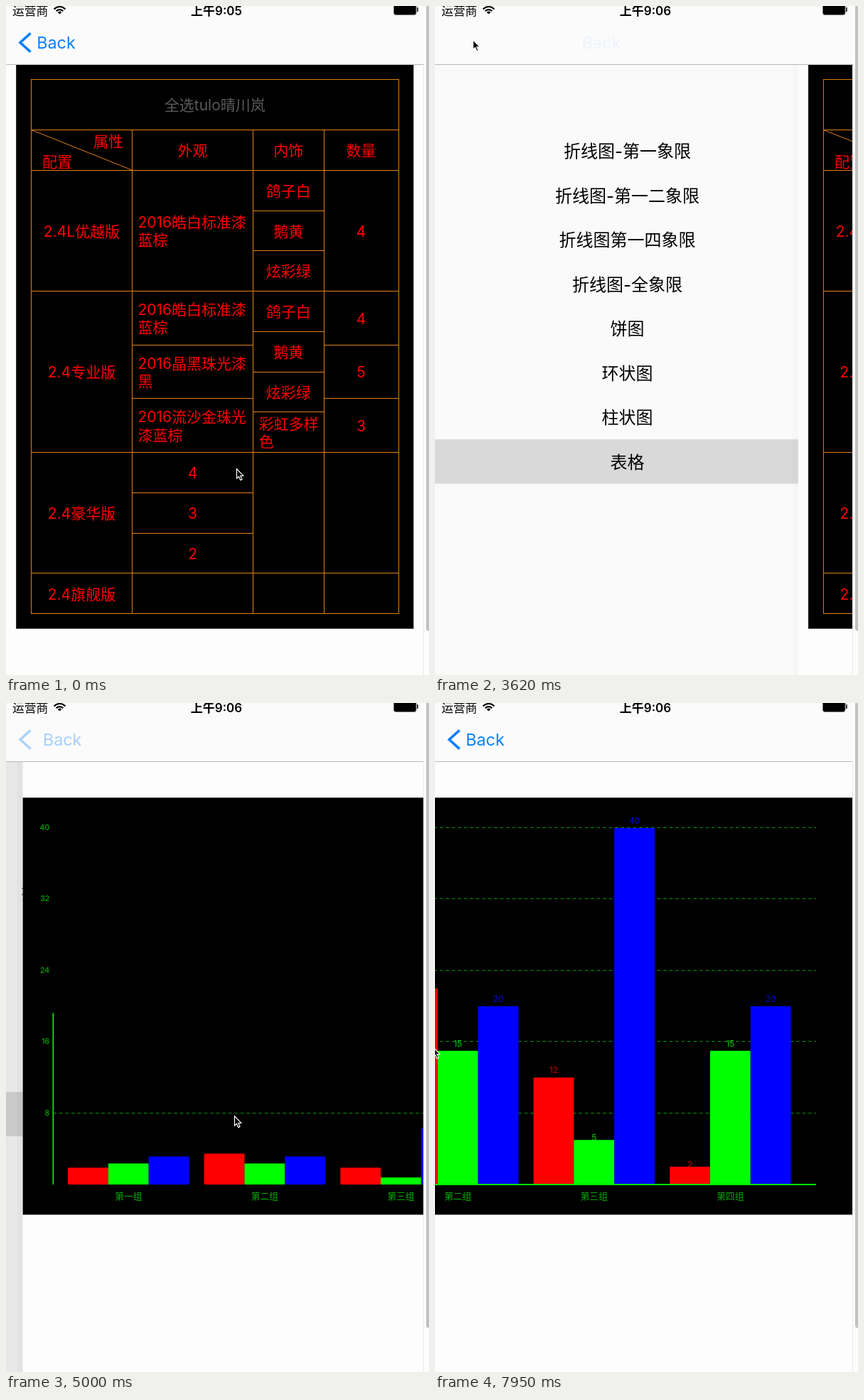
These frames come from a looping animation (595x942 px, 8 s). An HTML page with a canvas:

```html
<!DOCTYPE html>
<html lang="zh">
<head>
<meta charset="utf-8">
<style>
html, body { margin: 0; width: 595px; height: 942px; overflow: hidden; background: #fdfdfd; }
canvas { display: block; }
</style>
</head>
<body>
<canvas id="stage" width="595" height="942"></canvas>
<script>
const ctx = document.getElementById('stage').getContext('2d');
const W = 587.5, H = 942, LOOP = 8000;
const PT = W / 414; // the phone screen is 414 points wide
const PRESS = 3270, POP = 3451, PUSH = 4761.6, GROW = 4750;
const PAPER = '#fdfdfd';
const FONT = 'Inter, "Noto Sans CJK SC", "Noto Sans CJK", sans-serif';

const ramp = (t, start, length) => Math.min(1, Math.max(0, (t - start) / length));
const smooth = x => x * x * (3 - 2 * x);
// critically damped spring of the page transitions
const settle = ms => {
  const x = Math.max(0, ms) * 0.0209;
  return x > 14 ? 1 : 1 - (1 + x) * Math.exp(-x);
};

function rect(x, y, w, h, color) {
  ctx.fillStyle = color;
  ctx.fillRect(x, y, w, h);
}

function line(points, color, width = 1) {
  ctx.strokeStyle = color;
  ctx.lineWidth = width;
  ctx.beginPath();
  points.forEach(([x, y]) => ctx.lineTo(x, y));
  ctx.stroke();
}

// cy is the visual middle of the line
function text(str, x, cy, size, color, align = 'center', weight = 400) {
  ctx.font = `${weight} ${size}px ${FONT}`;
  ctx.textAlign = align;
  ctx.fillStyle = color;
  ctx.fillText(str, x, cy + size * 0.37);
}

// ---- table page ----
const TOP = 103.4, LEFT = 25 * PT, ORANGE = '#e07f14', RED = '#ff0000';
const COL_WIDTHS = [100, 120, 70, 74];
const WHITE = '2016皓白标准漆蓝棕';
const TRIMS = ['鸽子白', '鹅黄', '炫彩绿'];
// height in points, then the cells of each column, which share that height evenly
const ROWS = [
  [40, [''], ['外观'], ['内饰'], ['数量']],
  [120, ['2.4L优越版'], [WHITE], TRIMS, ['4']],
  [160, ['2.4专业版'], [WHITE, '2016晶黑珠光漆黑', '2016流沙金珠光漆蓝棕'], [...TRIMS, '彩虹多样色'], ['4', '5', '3']],
  [120, ['2.4豪华版'], ['4', '3', '2'], [''], ['']],
  [40, ['2.4旗舰版'], [''], [''], ['']]
];

function wrap(str, width) {
  const lines = [''];
  for (const c of str) {
    const last = lines.length - 1;
    if (ctx.measureText(lines[last] + c).width > width) lines.push(c);
    else lines[last] += c;
  }
  return lines;
}

function cell(str, x, y, w, h, color = RED) {
  const snap = v => Math.floor(v + 0.2) + 0.5;
  ctx.strokeStyle = ORANGE;
  ctx.lineWidth = 1;
  ctx.strokeRect(snap(x), snap(y), snap(x + w) - snap(x), snap(y + h) - snap(y));
  ctx.font = `21px ${FONT}`;
  const lines = wrap(str, w - 11), mid = y + h / 2 + 0.7;
  if (lines.length === 1) return text(str, x + w / 2, mid, 21, color);
  lines.forEach((s, i) => text(s, x + 8, mid + (i - 0.5) * 25.3, 21, color, 'left'));
}

function drawTable() {
  rect(10 * PT, 82, 394 * PT, 794.8, '#000');
  cell('全选tulo晴川岚', LEFT, TOP, 364 * PT, 50 * PT, '#5a5a5a');
  let y = TOP + 50 * PT;
  line([[LEFT, y], [LEFT + 100 * PT, y + 40 * PT]], ORANGE);
  text('属性', 144, y + 15.5, 21, RED);
  text('配置', 72, y + 44.5, 21, RED);
  for (const [points, ...columns] of ROWS) {
    let x = LEFT;
    columns.forEach((cells, c) => {
      const w = COL_WIDTHS[c] * PT, h = points * PT / cells.length;
      cells.forEach((s, i) => cell(s, x, y + i * h, w, h));
      x += w;
    });
    y += points * PT;
  }
}

// ---- chart page ----
const GROUPS = [[12, 15, 20], [22, 15, 20], [12, 5, 40], [2, 15, 20]];
const BAR_COLORS = ['#ff0000', '#00ff00', '#0000ff'];
const LABEL_COLORS = ['#d00000', '#00d800', '#0000dc'];
const BASE = 678, UNIT = 12.55, AXIS_X = 42.7, AXIS_END = 844, BAR = 56.8;

function drawChart(t) {
  const grow = smooth(ramp(t, GROW, 1000));
  const alongX = part => AXIS_X + (AXIS_END - AXIS_X) * part;
  rect(0, 133.3, W, 587.2, '#000');
  ctx.save();
  ctx.translate(-308 * ramp(t, 7650, 300), 0);

  for (let i = 0; i < 5; i++) {
    const value = (i + 1) * 8, y = Math.round(BASE - value * UNIT) - 0.5;
    text(String(value), 37.5, y - 0.5, 10.5, '#00b000', 'right', 500);
    ctx.setLineDash([4.5, 4]);
    line([[AXIS_X, y], [alongX(ramp(t, GROW + i * 260, 250)), y]], '#009a00', 1.1);
    ctx.setLineDash([]);
  }

  GROUPS.forEach((values, g) => {
    const x0 = 63.4 + g * 191.6;
    text('第' + '一二三四'[g] + '组', x0 + BAR * 1.5, 694.5, 12.7, '#00b400', 'center', 500);
    values.forEach((v, i) => {
      const x = x0 + i * BAR, h = v * UNIT;
      if (grow === 1) text(String(v), x + BAR / 2, BASE - h - (v < 10 ? 3.5 : 10.5), 12, LABEL_COLORS[i]);
      rect(x, BASE - h * grow, BAR, h * grow, BAR_COLORS[i]);
    });
  });

  line([[AXIS_X, BASE], [AXIS_X, BASE - 516 * ramp(t, 4760, 515)]], '#00e800', 1.8);
  line([[AXIS_X, BASE], [alongX(ramp(t, 5275, 500)), BASE]], '#00e800', 1.8);
  ctx.restore();
}

// ---- list page ----
const ITEMS = ['折线图-第一象限', '折线图-第一二象限', '折线图第一四象限', '折线图-全象限', '饼图', '环状图', '柱状图', '表格'];

function drawList(t, cover) {
  const pushing = t > 4500, row = 62.45;
  ctx.save();
  ctx.translate(-0.303 * W * cover, 0);
  ctx.globalAlpha = pushing ? ramp(t, 4729, 1) : 1 - ramp(t, 3900, 300);
  rect(0, 173 + (pushing ? 6 : 7) * row, W * 1.4, row, '#dcdcdc');
  ctx.globalAlpha = 1;
  ITEMS.forEach((s, i) => text(s, W / 2, 204.5 + i * row, 24, '#000'));
  ctx.restore();
  rect(0, 83, W, H - 83, `rgba(0,0,0,${0.084 * cover})`);
}

// ---- bars on top ----
function drawBack(t, cover) {
  const blue = '#0b80fb', pushing = t > 4500;
  const alpha = pushing ? ramp(t, 4785, 610) : t < PRESS ? 1 : 0.2 * (1 - ramp(t, 3450, 240));
  ctx.globalAlpha = alpha;
  text('Back', 70.5 + (pushing ? 215 : 188) * (1 - cover), 51.5, 23.3, blue);
  ctx.globalAlpha = alpha * cover * cover;
  line([[34.5, 38.3], [20, 51.5], [34.5, 64.7]], blue, 3.6);
  ctx.globalAlpha = 1;
}

function drawTop(t, cover) {
  rect(0, 0, W, 82, '#fbfbfb');
  rect(0, 82, W, 1, '#b9b9b9');
  text('运营商', 9, 7, 16.8, '#000', 'left');
  text('上午9:0' + (t < 2290 ? 5 : 6), 296, 6.5, 17, '#000', 'center', 600);
  // wireless symbol
  for (const r of [10.5, 6.3, 2]) {
    ctx.strokeStyle = '#000';
    ctx.lineWidth = r > 2 ? 2.2 : 3.6;
    ctx.beginPath();
    ctx.arc(75.5, 11.5, r, -Math.PI * 0.77, -Math.PI * 0.23);
    ctx.stroke();
  }
  // battery
  ctx.fillStyle = '#000';
  ctx.strokeStyle = '#777';
  ctx.lineWidth = 1;
  ctx.beginPath();
  ctx.roundRect(545.5, -4, 31.5, 16.5, 3);
  ctx.fill();
  ctx.stroke();
  rect(578, 2, 1.8, 6, '#333');
  drawBack(t, cover);
}

// ---- pointer moves: start, end, x, y ----
const MOVES = [
  [50, 440, 254, 341], [560, 1230, 56, 41], [1380, 1580, 53, 47],
  [3640, 4200, 319, 562], [4240, 4470, 321, 581],
  [5550, 6100, 348, 445], [6370, 6460, 341, 446],
  [6760, 7130, 409, 430], [7130, 7600, 304, 444], [7650, 7950, -3, 484]
];
const ARROW = new Path2D('M.5 .8V14.2L3.5 11.5 5.8 16.6 8 15.6 5.8 10.6 9.8 10.4Z');

function drawPointer(t) {
  let x = 324, y = 651;
  for (const [start, end, toX, toY] of MOVES) {
    const f = ramp(t, start, end - start);
    x += (toX - x) * f;
    y += (toY - y) * f;
  }
  ctx.save();
  ctx.translate(x, y);
  ctx.fillStyle = '#000';
  ctx.fill(ARROW);
  ctx.strokeStyle = '#fff';
  ctx.lineWidth = 1.2;
  ctx.stroke(ARROW);
  ctx.restore();
}

function draw(t) {
  // how far the detail page covers the list
  const cover = t < 4500 ? 1 - settle(t - POP) : settle(t - PUSH);
  const edge = W * (1 - cover);
  rect(0, 0, 595, H, PAPER);
  ctx.save();
  ctx.beginPath();
  ctx.rect(0, 0, W, H);
  ctx.clip();
  drawList(t, cover);
  rect(edge - 8, 83, 8, H - 83, `rgba(0,0,0,${0.7 * cover * cover * (1 - cover)})`);
  ctx.translate(edge, 0);
  rect(0, 83, W, H - 83, PAPER);
  if (t < 4500) drawTable();
  else drawChart(t);
  ctx.restore();
  drawTop(t, cover);
  rect(587, 83, 1, H - 83, '#e9e9e9');
  ctx.fillStyle = '#c1c1c1';
  ctx.beginPath();
  ctx.roundRect(591, -10, 8, 890, 4);
  ctx.fill();
  drawPointer(t);
}

function tick() {
  draw(performance.now() % LOOP);
  requestAnimationFrame(tick);
}
tick();
</script>
</body>
</html>
```
